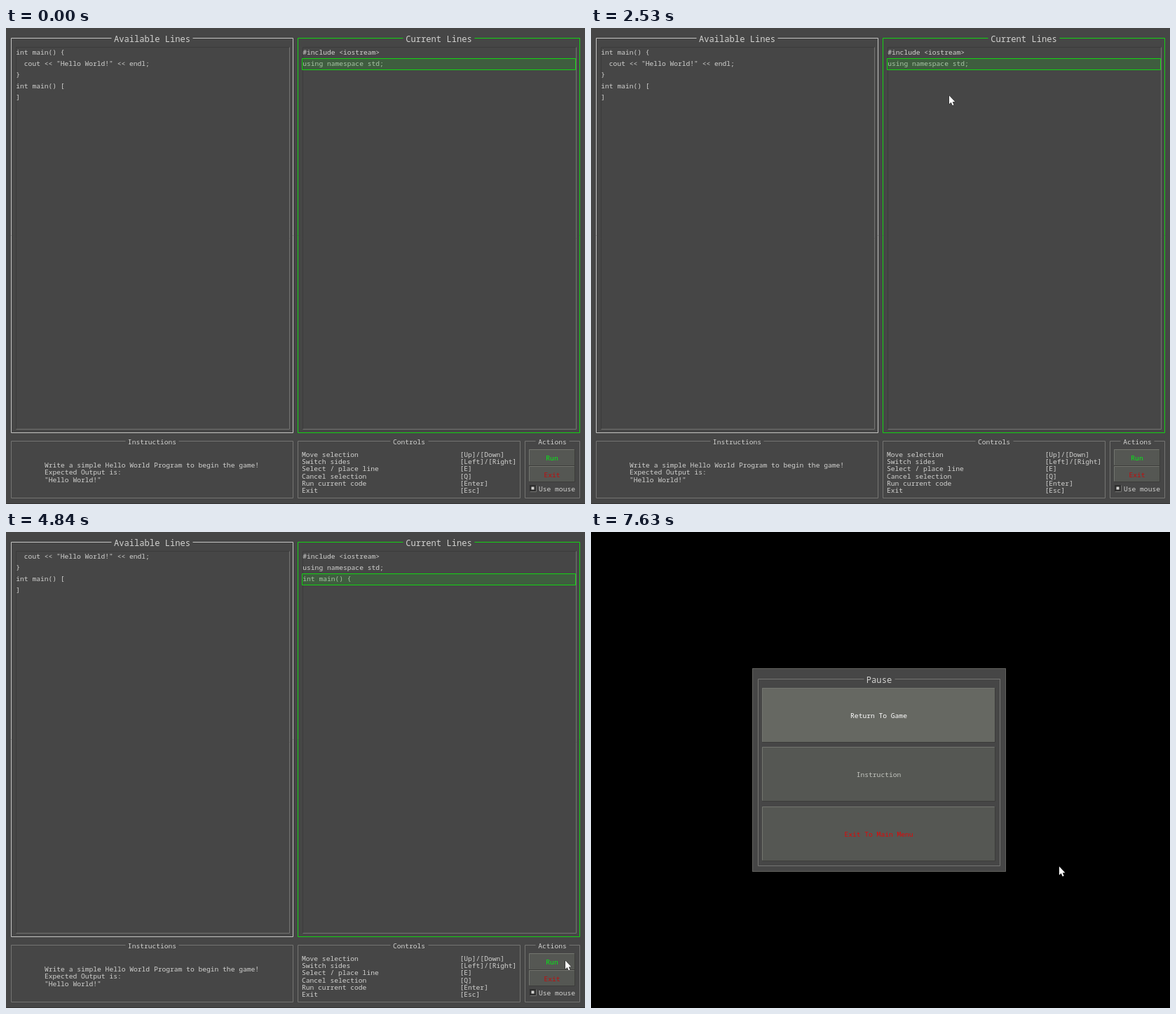
Animation of 826x678 px, one loop 8000 ms. Source, as an HTML page with a canvas:

```html
<!DOCTYPE html>
<html lang="en">
<head>
<meta charset="utf-8">
<title>Code line puzzle</title>
<style>
  html, body { margin: 0; width: 100%; height: 100%; overflow: hidden; background: #464646; }
  canvas { display: block; }
</style>
</head>
<body>
<canvas id="stage" width="826" height="678"></canvas>
<script>
const ctx = document.getElementById('stage').getContext('2d');
const LOOP = 8000, STEP = 70;
const BG = '#464646', INK = '#d2d2d0', EDGE = '#c4c4c2', DIM = '#747472';
const GREEN = '#14d214', RED = '#c40c0c', YELLOW = '#c8c814';
const SMALL = 9.63, LARGE = 12.12;

// Pointer moves: start time, number of steps, destination.
const moves = [
  [70, 1, 711, 575], [140, 3, 575, 375], [480, 7, 207, 80], [970, 4, 100, 34],
  [1320, 7, 530, 103], [2530, 5, 347, 43], [3410, 6, 530, 66],
  [4350, 8, 798, 611], [5230, 6, 668, 477]
];
const clicks = [[1250, 1320], [2330, 2530], [2880, 3010], [3210, 3410], [4020, 4350], [5170, 5240], [7100, 7170]];
const within = (t, a, b) => t >= a && t < b;

function text(str, x, y, color = INK, align = 'left', size = SMALL) {
  ctx.font = `${size}px "Noto Sans Mono", monospace`;
  ctx.textAlign = align;
  ctx.textBaseline = 'alphabetic';
  ctx.fillStyle = color;
  ctx.fillText(str, x, Math.round(y + size * 0.27));
}

function line(color, ...points) {
  ctx.strokeStyle = color;
  ctx.lineWidth = 1;
  ctx.beginPath();
  points.forEach(([x, y], i) => ctx[i ? 'lineTo' : 'moveTo'](x + 0.5, y + 0.5));
  ctx.stroke();
}

function fill(color, x0, y0, x1, y1) {
  ctx.fillStyle = color;
  ctx.fillRect(x0, y0, x1 - x0, y1 - y0);
}

// Border with a gap in its top edge for the centred title.
function frame(x0, y0, x1, y1, title, color, size = SMALL) {
  const mid = (x0 + x1 + 1) / 2, half = Math.round(title.length * size * 0.3 + 3.5);
  const left = Math.floor(mid - half), right = Math.floor(mid + half);
  line(color, [left, y0], [x0, y0], [x0, y1], [x1, y1], [x1, y0], [right, y0]);
  text(title, mid, y0 + 2.5, INK, 'center', size);
}

function button(x0, y0, x1, y1, label, color, face = '#555753') {
  fill(face, x0, y0, x1, y1);
  line('#3c3c3a', [x0, y1], [x1, y1], [x1, y0]);
  line('#73756f', [x0, y1 - 1], [x0, y0], [x1 - 1, y0]);
  text(label, (x0 + x1 + 1) / 2, (y0 + y1) / 2 + 2, color, 'center');
}

function listPanel(x, title, rows, border, selected, tint) {
  frame(x, 14, x + 402, 576, title, border, LARGE);
  line('#3b3b3b', [x + 7, 571], [x + 7, 27], [x + 397, 27]);
  line(DIM, [x + 7, 571], [x + 397, 571], [x + 397, 27]);
  rows.forEach((row, i) => text(row, x + 7.3, 35.3 + 16 * i));
  if (selected >= 0) {
    const y = 27 + 16 * selected;
    fill(tint === YELLOW ? 'rgba(160,160,40,.2)' : 'rgba(40,160,40,.25)', x + 6, y, x + 397, y + 17);
    line(tint, [x + 6, y], [x + 396, y], [x + 396, y + 16], [x + 6, y + 16], [x + 6, y]);
  }
}

function game(t) {
  fill(BG, 0, 0, 826, 678);
  line('#343434', [0, 677], [826, 677]);
  const available = ['int main() {', '  cout << "Hello World!" << endl;', '}', 'int main() [', ']'];
  const current = ['#include <iostream>', 'using namespace std;'];
  const placed = t >= 4020, carrying = within(t, 3410, 4350);
  if (placed) current.push(available.shift());
  const leftFocus = within(t, 1250, 2330) || within(t, 2880, 4350);
  const tint = carrying ? YELLOW : GREEN;
  const showRight = placed ? t < 5240 : !leftFocus || t >= 3760;
  const rightRow = !showRight ? -1 : t >= 3760 ? 2 : 1;
  listPanel(7, 'Available Lines', available, leftFocus ? tint : EDGE, leftFocus ? 0 : -1, tint);
  listPanel(416, 'Current Lines', current, leftFocus ? EDGE : GREEN, rightRow, placed ? GREEN : tint);

  frame(7, 588, 409, 669, 'Instructions', DIM);
  ['Write a simple Hello World Program to begin the game!', 'Expected Output is:', '"Hello World!"']
    .forEach((s, i) => text(s, 55, 623.5 + 10.2 * i));

  frame(416, 588, 733, 669, 'Controls', DIM);
  [['Move selection', '[Up]/[Down]'], ['Switch sides', '[Left]/[Right]'], ['Select / place line', '[E]'],
   ['Cancel selection', '[Q]'], ['Run current code', '[Enter]'], ['Exit', '[Esc]']]
    .forEach(([name, key], i) => {
      text(name, 422, 608.3 + 10.2 * i);
      text(key, 647.5, 608.3 + 10.2 * i);
    });

  frame(740, 588, 818, 669, 'Actions', DIM);
  button(746, 600, 811, 623, 'Run', '#00f014');
  button(746, 624, 811, 646, 'Exit', RED);
  fill('#2e2e2e', 747, 651, 757, 661);
  line(DIM, [747, 660], [756, 660], [756, 651]);
  fill(INK, 749.5, 653.5, 753.5, 657.5);
  text('Use mouse', 760, 657.7);
}

function resultDialog() {
  fill(BG, 230, 285, 592, 393);
  line('#566049', [230, 285], [591, 285], [591, 392], [230, 392], [230, 285]);
  line('#a01818', [391, 297], [238, 297], [238, 361]);
  line('#7a2828', [430, 297], [583, 297], [583, 361]);
  text('Info', 411, 300, INK, 'center');
  text('Incorrect!', 309, 329);
  text('Press the continue button to retry.', 309, 339.2);
  button(237, 368, 583, 384, 'Continue', INK);
}

function pauseMenu() {
  fill('#000', 0, 0, 826, 678);
  fill(BG, 230, 194, 592, 484);
  line('#62625e', [230, 194], [591, 194], [591, 483], [230, 483], [230, 194]);
  frame(238, 209, 583, 475, 'Pause', DIM, LARGE);
  button(244, 222, 576, 299, 'Return To Game', '#fff', '#666862');
  button(244, 306, 576, 383, 'Instruction', '#c4c6c0');
  button(244, 391, 576, 468, 'Exit To Main Menu', '#e00808');
}

function pointerAt(t) {
  let [, , x, y] = moves[0];
  for (const [start, steps, toX, toY] of moves) {
    if (t < start) break;
    const p = Math.min(1, (Math.floor((t - start) / STEP) + 1) / steps);
    const eased = p * p * (3 - 2 * p);
    x += (toX - x) * eased;
    y += (toY - y) * eased;
  }
  return [x, y];
}

function pointer(t) {
  if (t < moves[0][0]) return;
  const [x, y] = pointerAt(t);
  ctx.save();
  ctx.translate(x, y);
  ctx.beginPath();
  [[0, -0.5], [0, 11.5], [2.7, 9], [4.7, 13.6], [6.6, 12.7], [4.7, 8.4], [8.2, 8.2]]
    .forEach(([px, py]) => ctx.lineTo(px, py));
  ctx.closePath();
  ctx.strokeStyle = '#222';
  ctx.lineWidth = 1;
  ctx.stroke();
  ctx.fillStyle = '#fff';
  ctx.fill();
  if (clicks.some(([a, b]) => within(t, a, b))) {
    ctx.fillStyle = 'rgba(204,198,14,.72)';
    ctx.beginPath();
    ctx.arc(0.3, -0.3, 9, 0, Math.PI * 2);
    ctx.fill();
  }
  ctx.restore();
}

function draw(t) {
  if (t >= 7630) pauseMenu();
  else {
    game(t);
    if (t >= 5240) resultDialog();
  }
  pointer(t);
}

const begin = performance.now();
function tick() {
  draw((performance.now() - begin) % LOOP);
  requestAnimationFrame(tick);
}
tick();
</script>
</body>
</html>
```
